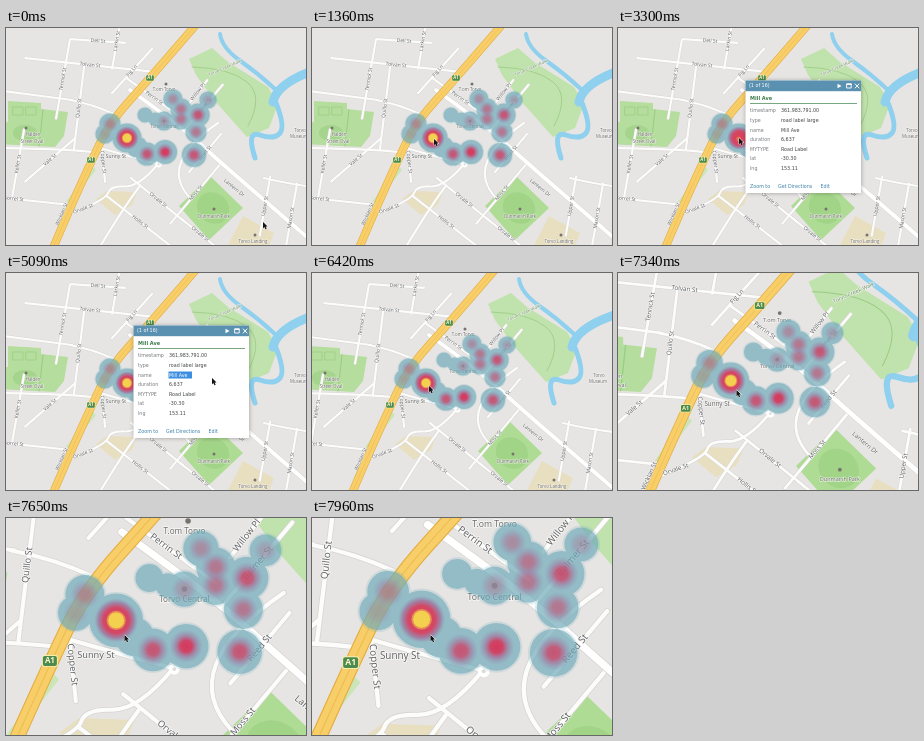
An HTML page with a canvas for the animation above (8 s loop, 300 by 217 pixels).

```html
<!DOCTYPE html>
<html lang="en">
<head>
<meta charset="utf-8">
<title>Street heat map</title>
<style>
  html, body { margin: 0; width: 100%; height: 100%; overflow: hidden; background: #e7e5e3; }
  canvas { display: block; width: 100vw; height: 100vh; }
</style>
</head>
<body>
<canvas id="stage"></canvas>
<script>
const W = 300, H = 217, LOOP = 8000;
const canvas = document.getElementById('stage');
const ctx = canvas.getContext('2d');
const MAP_FONT = '"Open Sans", "Noto Sans", sans-serif';
const UI_FONT = '"DejaVu Sans", sans-serif';

const clamp = v => Math.max(0, Math.min(1, v));
const mix = (a, b, k) => a + (b - a) * k;

// Progress from a to b in n visible jumps, the first one at a.
function steps(t, a, b, n) {
  if (t < a) return 0;
  if (t >= b) return 1;
  return (Math.floor((t - a) / (b - a) * (n - 1)) + 1) / n;
}

function area(color, pts) {
  ctx.beginPath();
  for (let i = 0; i < pts.length; i += 2) ctx.lineTo(pts[i], pts[i + 1]);
  ctx.closePath();
  ctx.fillStyle = color;
  ctx.fill();
}

// Smooth open curve through the midpoints of the given points.
function line(color, width, pts) {
  const n = pts.length;
  ctx.beginPath();
  ctx.moveTo(pts[0], pts[1]);
  for (let i = 2; i < n - 4; i += 2) {
    ctx.quadraticCurveTo(pts[i], pts[i + 1], (pts[i] + pts[i + 2]) / 2, (pts[i + 1] + pts[i + 3]) / 2);
  }
  if (n > 4) ctx.quadraticCurveTo(pts[n - 4], pts[n - 3], pts[n - 2], pts[n - 1]);
  else ctx.lineTo(pts[2], pts[3]);
  ctx.strokeStyle = color;
  ctx.lineWidth = width;
  ctx.stroke();
}

function disc(x, y, r, fill) {
  ctx.beginPath();
  ctx.arc(x, y, r, 0, 7);
  ctx.fillStyle = fill;
  ctx.fill();
}

function oval(x, y, rx, ry, turn, fill) {
  ctx.beginPath();
  ctx.ellipse(x, y, rx, ry, turn, 0, 7);
  ctx.fillStyle = fill;
  ctx.fill();
}

// Type is set large and scaled down so small sizes keep their spacing.
function text(str, x, y, o = {}) {
  const { size = 4.8, color = '#55565a', turn = 0, align = 'left', weight = 400, font = UI_FONT, halo } = o;
  ctx.save();
  ctx.translate(x, y);
  ctx.rotate(turn * Math.PI / 180);
  ctx.scale(0.1, 0.1);
  ctx.font = `${weight} ${size * 10}px ${font}`;
  ctx.textAlign = align;
  ctx.textBaseline = 'middle';
  if (halo) {
    ctx.strokeStyle = halo;
    ctx.lineWidth = 10;
    ctx.strokeText(str, 0, 0);
  }
  ctx.fillStyle = color;
  ctx.fillText(str, 0, 0);
  ctx.restore();
}

function label(str, x, y, turn = 0, size = 5, color = '#5c5d60') {
  text(str, x, y, { size, turn, color, align: 'center', font: MAP_FONT, halo: 'rgba(250,250,249,.75)' });
}

// name, x, y, angle, length of the road centred under the name
const streets = [
  ['Dell St', 92, 13, 4, 54], ['Larkin St', 111, 13, -80, 56], ['Tolvan St', 84, 37, 6, 130],
  ['Fig Ln', 126, 43, -48, 60], ['Tennick St', 57, 51, -80, 80], ['Quillo St', 73, 80, -83, 84],
  ['Vale St', 44, 132, -41, 66], ['Keller St', 12, 136, -80, 70], ['Sorrel St', 8, 171, 6, 110],
  ['Wicklan St', 56, 186, -66, 0], ['Orvale St', 77, 181, -19, 0], ['Copper St', 97, 134, 84, 40],
  ['Sunny St', 110, 129, 0, 0], ['Hollis St', 134, 194, 38, 84], ['Orvale St', 152, 172, 39, 70],
  ['Orvale St', 194, 206, 39, 50], ['Moss St', 190, 165, -50, 80], ['Lantern Dr', 228, 160, 40, 0],
  ['Perrin St', 148, 70, 36, 68], ['Balmer St', 198, 79, -50, 58], ['Willow Pl', 192, 64, -52, 30],
  ['Reed St', 199, 125, -50, 50], ['Upper St', 259, 178, -80, 60], ['Mason St', 285, 190, -80, 70]
];
const bends = [
  [-10, 62, 66, 72], [64, 72, 86, 76, 108, 86], [-10, 120, 60, 121, 86, 124],
  [91, 119, 118, 127, 152, 136], [62, 187, 100, 172, 104, 158, 133, 159, 152, 136],
  [212, 95, 152, 136, 184, 170], [133, 159, 116, 182, 92, 222], [258, 150, 282, 156, 315, 160]
];
const highway = [194, -8, 146, 48, 104, 94, 85, 134, 61, 187, 45, 225];
const avenue = [124, 62, 176, 99, 217, 137, 315, 221];

const places = [
  ['T.om Torvo', 158, 62], ['Torvo Central', 158, 99],
  ['Halden', 27, 107], ['Street Oval', 26, 114],
  ['Dunmarsh Park', 208, 189], ['Torvo Landing', 247, 214],
  ['Torvo', 294, 103], ['Museum', 293, 109]
];

function straight([, x, y, turn, length]) {
  const a = turn * Math.PI / 180;
  const dx = Math.cos(a) * length / 2, dy = Math.sin(a) * length / 2;
  return [x - dx, y - dy, x + dx, y + dy];
}
const roads = streets.filter(s => s[4]).map(straight).concat(bends);

function shield(x, y) {
  for (const [rx, ry, color] of [[4.3, 3.2, '#f5efb0'], [3.8, 2.7, '#4c8a4d']]) {
    ctx.beginPath();
    ctx.roundRect(x - rx, y - ry, rx * 2, ry * 2, 1);
    ctx.fillStyle = color;
    ctx.fill();
  }
  text('A1', x, y + 0.1, { size: 4.3, weight: 700, color: '#fff9cf', align: 'center', font: MAP_FONT });
}

function drawMap() {
  const green = '#b5dd9d', sand = '#e8dfc0', water = '#8ed0ee', path = '#98cc82';
  area(green, [2, 73, 35, 75, 35, 81, 62, 84, 58, 108, 49, 119, -8, 116, -8, 95, 2, 94]);
  line(path, 1, [37, 82, 33, 118]);
  ctx.lineWidth = 0.7;
  for (const x of [7, 20]) ctx.strokeRect(x, 79, 10, 8);
  oval(19, 105, 12, 8, 0, '#a5d48d');

  area('#c0e2ac', [183, 31, 206, 20, 222, 34, 262, 59, 272, 76, 263, 100, 241, 109, 209, 73, 190, 47]);
  area('#cae6b8', [86, 138, 90, 142, 64, 175, 60, 174]);
  area(sand, [90, 171, 101, 163, 131, 164, 126, 177, 109, 187]);
  area(sand, [237, 188, 268, 205, 260, 225, 218, 225]);

  line(water, 4, [214, 6, 216, 20, 253, 46, 270, 62]);
  line(water, 9, [315, 40, 271, 54, 267, 74]);
  line(water, 5, [268, 70, 280, 98, 268, 112, 240, 102, 249, 130]);
  line(path, 0.8, [186, 39, 224, 40, 258, 68, 242, 98]);

  area('#afdc95', [173, 178, 204, 148, 237, 180, 203, 212]);
  oval(207, 180, 17, 15, 0.7, '#a2d488');

  for (const r of roads) line('#d7d5d2', 3, r);
  for (const r of roads) line('#fcfcfb', 2.2, r);
  line('#d4d2cf', 4.6, avenue);
  line('#ffffff', 3.8, avenue);
  disc(152.5, 136.4, 3, '#ffffff');
  disc(152.5, 136.4, 1, '#dcdbd8');
  line('#e4ad42', 8.2, highway);
  line('#f8ce68', 7, highway);
  line('#eebd55', 0.6, highway);

  for (const [name, x, y, turn] of streets) label(name, x, y, turn);
  label('Torvo Creek Walk', 219, 40, -24, 4.4, '#6c8b60');
  for (const [name, x, y] of places) label(name, x, y, 0, 4.4, '#67645f');
  for (const [x, y] of [[160, 56], [158, 93], [20, 100], [208, 181], [249, 207]]) disc(x, y, 1.5, '#77736c');
  shield(144, 50);
  shield(85, 132);
}

// x, y, radius, strength
const spots = [
  [104, 96, 11, 0.5], [99, 106, 10, 0.25], [121, 110, 15, 0], [131, 119, 11, 0],
  [141, 126, 12, 0.85], [159, 124, 12.5, 1], [188, 127, 12.5, 0.85], [139, 87, 8, 0],
  [149, 91, 7, 0], [158, 93, 10, 0.4], [167, 71, 10, 0.5], [175, 81, 11, 0.65],
  [175, 91, 11, 0.65], [192, 87, 12, 0.85], [202, 72, 9, 0.35], [190, 104, 11, 0.65]
];

function glow(x, y, r, stops) {
  const g = ctx.createRadialGradient(x, y, 0, x, y, r);
  for (const [at, color] of stops) g.addColorStop(at, color);
  disc(x, y, r, g);
}

function drawHeat(dimmed) {
  for (const [grow, alpha] of [[0.6, 0.2], [-0.4, 0.62]]) {
    ctx.beginPath();
    for (const [x, y, r] of spots) {
      ctx.moveTo(x + r + grow, y);
      ctx.arc(x, y, r + grow, 0, Math.PI * 2);
    }
    ctx.fillStyle = `rgba(112,171,186,${alpha})`;
    ctx.fill();
  }
  for (const [x, y, r, s] of spots) {
    if (!s) continue;
    const rgb = [mix(165, 213, s), mix(124, 56, s), mix(150, 92, s)].map(Math.round).join();
    glow(x, y, r * 0.73, [
      [0, `rgba(${rgb},${s})`], [0.35, `rgba(${rgb},${s * 0.9})`],
      [0.62, `rgba(168,110,152,${s * 0.65})`], [1, 'rgba(140,142,178,0)']
    ]);
  }
  glow(121, 110, 12, [
    [0, 'rgb(222,62,84)'], [0.58, 'rgba(214,66,96,.95)'],
    [0.8, 'rgba(168,98,146,.65)'], [1, 'rgba(136,140,176,0)']
  ]);
  if (dimmed) {
    disc(120.5, 111, 2.4, 'rgba(226,140,92,.6)');
  } else {
    disc(121, 110, 5.2, '#e88d57');
    disc(121, 110, 4.3, '#f4d04f');
  }
}

const rows = [
  ['timestamp', '361,983,791.00'], ['type', 'road label large'], ['name', 'Mill Ave'],
  ['duration', '6,637'], ['MYTYPE', 'Road Label'], ['lat', '-30.30'], ['lng', '153.11']
];

function drawPopup(selected) {
  ctx.save();
  ctx.shadowColor = 'rgba(0,0,0,.4)';
  ctx.shadowBlur = 5 * canvas.width / W;
  ctx.fillStyle = '#ffffff';
  ctx.fillRect(127.5, 52.5, 115.5, 112.5);
  ctx.restore();
  ctx.fillStyle = '#5a91b1';
  ctx.fillRect(127.5, 52.5, 115.5, 10.7);
  text('(1 of 16)', 131, 58, { color: '#ffffff' });

  area('#ffffff', [219.5, 55.7, 223.5, 58, 219.5, 60.3]);
  ctx.strokeStyle = '#ffffff';
  ctx.lineWidth = 0.9;
  ctx.strokeRect(229, 56, 4.2, 4);
  ctx.fillRect(228.6, 55.5, 5, 1.4);
  line('#ffffff', 1, [237.2, 56, 241, 60]);
  line('#ffffff', 1, [241, 56, 237.2, 60]);

  text('Mill Ave', 132, 70.3, { size: 5, weight: 700, color: '#3c7a4a' });
  ctx.fillStyle = '#559363';
  ctx.fillRect(132, 75.2, 107, 0.8);
  if (selected > 0) {
    ctx.fillStyle = '#3d8ee0';
    ctx.fillRect(162.5, 98.5, 23.5 * selected, 7);
  }
  rows.forEach(([key, value], i) => {
    const y = 83.2 + i * 9.6;
    text(key, 132, y, { color: '#777a7d' });
    text(value, 163, y, { color: i === 2 && selected > 0.9 ? '#ffffff' : '#414447' });
  });
  for (const [name, x] of [['Zoom to', 132], ['Get Directions', 160], ['Edit', 202.5]]) {
    text(name, x, 159, { color: '#3b81a8' });
  }
}

// start, end, jumps, x, y
const moves = [
  [440, 1210, 11, 131, 118], [1280, 1360, 2, 122, 111], [2140, 2230, 2, 121, 110],
  [3530, 4010, 7, 162, 101], [4470, 4770, 5, 199, 105], [5020, 5090, 2, 206, 105],
  [6420, 6420, 1, 117, 113], [6800, 6870, 2, 118.5, 117]
];

function pointer(t) {
  let x = 257, y = 194;
  for (const [a, b, n, toX, toY] of moves) {
    const k = steps(t, a, b, n);
    x = mix(x, toX, k);
    y = mix(y, toY, k);
  }
  return [x, y];
}

function drawPointer(x, y, beam) {
  if (beam) {
    line('#222222', 0.8, [x, y - 3, x, y + 4]);
    for (const end of [y - 3, y + 4]) line('#222222', 0.7, [x - 1.4, end, x + 1.4, end]);
    return;
  }
  ctx.save();
  ctx.translate(x, y);
  area('#161616', [0, 0, 0, 6.2, 1.5, 4.9, 2.5, 7.2, 3.6, 6.7, 2.6, 4.5, 4.5, 4.4]);
  ctx.strokeStyle = 'rgba(255,255,255,.85)';
  ctx.lineWidth = 0.9;
  ctx.globalCompositeOperation = 'source-over';
  ctx.stroke();
  ctx.fill();
  ctx.restore();
}

// Eased doubling of the scale, shown in nine jumps.
function zoomAt(t) {
  if (t < 7340) return 1;
  const shown = 7340 + Math.floor((t - 7340) / 77.5) * 77.5;
  return 2 ** (1 - Math.exp((7270 - shown) / 178));
}

function draw(t) {
  const dpr = window.devicePixelRatio || 1;
  const w = Math.round(innerWidth * dpr), h = Math.round(innerHeight * dpr);
  if (canvas.width !== w || canvas.height !== h) {
    canvas.width = w;
    canvas.height = h;
  }
  ctx.setTransform(w / W, 0, 0, h / H, 0, 0);
  ctx.lineCap = 'round';
  ctx.lineJoin = 'round';
  ctx.fillStyle = '#e7e5e3';
  ctx.fillRect(0, 0, W, H);

  const zoom = zoomAt(t);
  ctx.save();
  ctx.translate(118.5, 119);
  ctx.scale(zoom, zoom);
  ctx.translate(-118.5 - (t >= 6420 ? 7 : 0), -119);
  drawMap();
  drawHeat(t >= 2690 && t < 3530);
  ctx.restore();

  const [x, y] = pointer(t);
  if (t >= 3300 && t < 6420) drawPopup(t < 4470 ? 0 : clamp((x - 162) / 24));
  drawPointer(x, y, t >= 4010 && t < 4770);
}

const start = performance.now();
function tick() {
  draw((performance.now() - start) % LOOP);
  requestAnimationFrame(tick);
}
tick();
</script>
</body>
</html>
```
